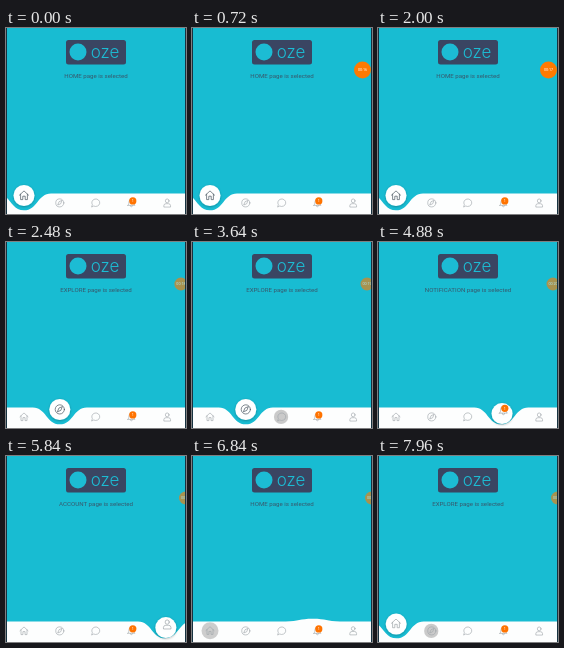
An HTML page for the animation above (8 s loop, 180 by 186 pixels).

```html
<!DOCTYPE html>
<html lang="en">
<head>
<meta charset="utf-8">
<title>Bottom navigation</title>
<style>
  html, body { margin: 0; width: 100%; height: 100%; overflow: hidden; background: #18bcd2; }
  svg { display: block; width: 180px; height: 186px; }
  text { font-family: Roboto, "Open Sans", sans-serif; text-anchor: middle; }
  .word { font: 300 17px Inter, sans-serif; fill: #1cbcd4; }
  .title { font-size: 6.15px; fill: #38566a; }
  .icon { fill: none; stroke-width: .7; stroke-linecap: round; stroke-linejoin: round; }
  .tiny { font-size: 3.7px; fill: #fff; }
</style>
</head>
<body>
<svg id="stage" viewBox="0 0 180 186">
  <defs>
    <filter id="soft" x="-30%" y="-30%" width="160%" height="160%">
      <feDropShadow dx="0" dy=".7" stdDeviation=".8" flood-color="#000" flood-opacity=".32"/>
    </filter>
  </defs>
  <rect width="180" height="186" fill="#18bcd2"/>
  <rect x="60" y="12" width="60" height="24.5" rx="2.5" fill="#3a4562"/>
  <circle cx="72" cy="24" r="8.5" fill="#1cbcd4"/>
  <text class="word" x="99" y="29.5">oze</text>
  <text class="title" id="title" x="90" y="50.4"></text>
  <path id="bar" fill="#fdfefe"/>
  <g id="cells"></g>
  <g id="bubble">
    <circle id="disc" r="8.5" fill="#ff7a00"/>
    <text class="tiny" id="clock" y="1.3"></text>
  </g>
  <path d="M.5 0V186M179.5 0V186" stroke="#173240"/>
</svg>
<script>
const LOOP = 8000, DP = 0.4375;
const BAR_TOP = 165.4, BAR_END = 187, DIP = 182.3, BUMP = 162.2, HALF = 62 * DP;
const $ = id => document.getElementById(id);

// Icons are drawn around 0,0 at their selected size.
const pages = [
  ["HOME", "M-4.6-.2 0-4.5 4.6-.2M-3.4-1.2V4.2H-1.2V.8H1.2V4.2H3.4V-1.2"],
  ["EXPLORE", "M4.6 0A4.6 4.6 0 1 1-4.6 0A4.6 4.6 0 1 1 4.6 0ZM2.4-2.4 1 1-2.4 2.4-1-1Z"],
  ["MESSAGE", "M-4.4 4.3-3.7 2A4.5 4.3 0 1 1-1.8 3.7Z"],
  ["NOTIFICATION", "M-4 2.8H4C2.8 1.7 2.9.6 2.8-1A2.8 3 0 0 0-2.8-1C-2.9.6-2.8 1.7-4 2.8ZM-1.2 3.2A1.2 1.2 0 0 0 1.2 3.2"],
  ["ACCOUNT", "M2.1-2.3A2.1 2.2 0 1 1-2.1-2.3A2.1 2.2 0 1 1 2.1-2.3ZM-3.8 4.3V3A2.5 2.3 0 0 1-1.3.9H1.3A2.5 2.3 0 0 1 3.8 3V4.3Z"]
];

// Each tap: touch time, time the move starts, page.
const taps = [
  [2060, 2150, 1], [3560, 3660, 2], [4560, 4670, 3],
  [5520, 5630, 4], [6560, 6645, 0], [7880, 7940, 1]
].map(([touch, start, to], i, all) => {
  const from = i ? all[i - 1][2] : 0, steps = Math.abs(to - from);
  return { touch, start, to, from, steps, time: steps * 100 + 150 };
});

const clamp = v => Math.min(1, Math.max(0, v));
const mix = (a, b, f) => a + (b - a) * f;
const ramp = (t, from, to) => clamp((t - from) / (to - from));
const smooth = f => (1 - Math.cos(Math.PI * clamp(f))) / 2;
const cellX = i => 18 + 35.8 * i;

// cubic-bezier(.4, 0, .2, 1)
function ease(x) {
  if (x <= 0) return 0;
  if (x >= 1) return 1;
  let lo = 0, hi = 1, s;
  for (let i = 0; i < 24; i++) {
    s = (lo + hi) / 2;
    const u = 1 - s;
    if (1.2 * u * u * s + .6 * u * s * s + s * s * s < x) lo = s; else hi = s;
  }
  return s * s * (3 - 2 * s);
}

function add(parent, tag, attrs) {
  const el = document.createElementNS("http://www.w3.org/2000/svg", tag);
  set(el, attrs);
  return parent.appendChild(el);
}
function set(el, attrs) {
  for (const k in attrs) el.setAttribute(k, attrs[k]);
}

const cells = pages.map(([, shape], i) => {
  const disc = add($("cells"), "circle", { r: 24 * DP, fill: "#fff" });
  const face = add($("cells"), "g", {});
  const ripple = add(face, "circle", { fill: "#757575" });
  const icon = add(face, "path", { d: shape, class: "icon" });
  if (i === 3) {
    add(face, "circle", { cx: 1.4, cy: -2, r: 3.6, fill: "#ff7300" });
    add(face, "text", { class: "tiny", x: 1.4, y: -.7 }).textContent = "1";
  }
  return { disc, face, ripple, icon };
});

function drawBar(t, tap) {
  let x = cellX(0), y = DIP;
  if (tap) {
    const f = (t - tap.start) / tap.time;
    x = mix(cellX(tap.from), cellX(tap.to), smooth(f));
    // Long moves flatten the dip into a bump halfway.
    if (tap.steps > 1) y = mix(BUMP, DIP, Math.abs(2 * ease(f) - 1));
  }
  const q = HALF / 2;
  $("bar").setAttribute("d", `M-60 ${BAR_TOP}H${x - HALF}
    C${x - q} ${BAR_TOP} ${x - q} ${y} ${x} ${y}
    C${x + q} ${y} ${x + q} ${BAR_TOP} ${x + HALF} ${BAR_TOP}
    H240V${BAR_END}H-60Z`);
}

function drawCell(i, t) {
  let p = i ? 0 : 1, side = 1, glow = 0, grow = 0;
  for (const tap of taps) {
    if (tap.to === i && t >= tap.touch) {
      const age = t - tap.touch;
      glow = .38 * ramp(age, -20, 60) * (1 - ramp(age, 290, 380));
      grow = ramp(age, 0, 180);
    }
    if (t < tap.start) continue;
    const age = t - tap.start;
    if (tap.to === i) {
      p = ease((age - tap.time / 4) / tap.time);
      side = tap.to > tap.from ? -1 : 1;
    } else if (tap.from === i) {
      p = 1 - ease(age / 250);
    }
  }
  const { disc, face, ripple, icon } = cells[i], x = cellX(i), rest = 1 - p;
  set(disc, {
    cx: x + side * rest * 24 * DP,
    cy: 167.5 + rest * 72 * DP,
    filter: p > .7 ? "url(#soft)" : "none"
  });
  set(face, { transform: `translate(${x} ${167.4 + rest * 7.5})` });
  // The ripple fades as the page's disc takes its place.
  set(ripple, { cx: grow - 1, r: mix(6, 8.5, grow), opacity: glow * rest * rest });
  set(icon, {
    transform: `scale(${1 - .12 * rest})`,
    stroke: p === 1 ? "#4a5660" : "#9da4a8"
  });
}

function drawBubble(t) {
  const dim = smooth(ramp(t, 2250, 2500));
  const x = 192 - 21.5 * smooth(ramp(t, 80, 400)) + 4.5 * dim
    + 4.5 * smooth(ramp(t, 5560, 5760));
  set($("bubble"), { transform: `translate(${x} 42)`, opacity: 1 - .38 * dim });
  set($("disc"), { r: 8.5 - 2 * dim });
  $("clock").textContent = "00:" + (16 + Math.max(0, Math.floor((t - 360) / 1000)));
}

function draw(t) {
  const tap = taps.filter(k => t >= k.start).pop();
  $("title").textContent = pages[tap ? tap.to : 0][0] + " page is selected";
  drawBar(t, tap);
  cells.forEach((_, i) => drawCell(i, t));
  drawBubble(t);
}

const begin = performance.now();
function tick() {
  draw((performance.now() - begin) % LOOP);
  requestAnimationFrame(tick);
}
tick();
</script>
</body>
</html>
```
